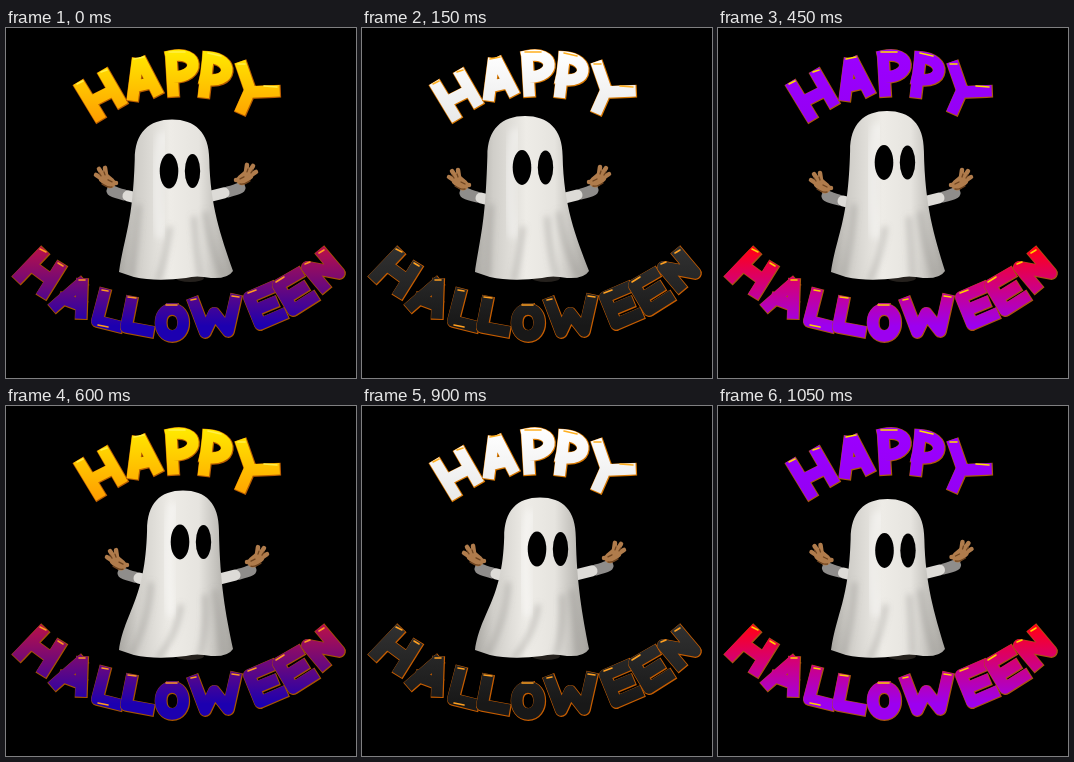
These frames come from a looping animation (350x350 px, 1200 ms). An HTML page:

```html
<!DOCTYPE html>
<html lang="en">
<head>
<meta charset="utf-8">
<title>Happy Halloween</title>
<style>
  html, body { margin: 0; width: 100%; height: 100%; overflow: hidden; background: #000; }
  svg { display: block; width: 100%; height: 100%; }
  .word path { fill: none; stroke-linejoin: round; stroke-linecap: square; }
  .word .edge { stroke: var(--edge); stroke-width: 13; }
  .word .face { stroke-width: 11.4; }
  .word .glint { stroke: var(--glint); stroke-width: 1.6; stroke-linecap: round; }
  #happy .face { stroke: url(#happyFill); }
  #halloween .face { stroke: url(#halloweenFill); }
  .stopA { stop-color: var(--a); }
  .stopB { stop-color: var(--b); }
  .fold { fill: none; stroke-linecap: round; filter: url(#soft); }
  .skin, .sleeve { fill: none; stroke: #b07c4c; stroke-linecap: round; stroke-linejoin: round; }
  .shade { stroke: #6e4420; }
  .sleeve { stroke-width: 11; }
</style>
</head>
<body>
<svg viewBox="0 0 350 350" role="img" aria-label="Happy Halloween">
  <defs>
    <linearGradient id="happyFill" gradientUnits="userSpaceOnUse" x1="0" y1="24" x2="0" y2="94">
      <stop class="stopA"/><stop offset="1" class="stopB"/>
    </linearGradient>
    <linearGradient id="halloweenFill" gradientUnits="userSpaceOnUse" x1="0" y1="222" x2="0" y2="298">
      <stop class="stopA"/><stop offset="1" class="stopB"/>
    </linearGradient>
    <linearGradient id="cloth">
      <stop stop-color="#a9a7a2"/><stop offset=".16" stop-color="#d0cec9"/>
      <stop offset=".45" stop-color="#eeece7"/><stop offset=".7" stop-color="#e6e4df"/>
      <stop offset="1" stop-color="#a3a19c"/>
    </linearGradient>
    <filter id="soft" x="-50%" y="-50%" width="200%" height="200%">
      <feGaussianBlur stdDeviation="3"/>
    </filter>
    <clipPath id="bodyClip"><path class="outline"/></clipPath>
    <g id="arm">
      <path class="sleeve" stroke="#8f8d8b" style="stroke:#8f8d8b" d="M6 13Q10 15 18 17"/>
      <path class="sleeve" style="stroke:#dddbd7" d="M22 18L38 22"/>
      <path class="skin" stroke-width="11" d="M-2 0L4 5"/>
      <path class="skin" stroke-width="4.5" d="M-4 1L-10 -3M-3 -3L-7 -9M0 -3L-1 -10M4 5L10 5"/>
      <path class="skin shade" stroke-width="1.3" d="M-4 6Q2 10 6 9M-5 -2L-7 -5M-1 -3L-2 -6M2 2L6 4"/>
    </g>
  </defs>
  <rect width="350" height="350"/>
  <g id="happy" class="word"></g>
  <g id="ghost">
    <ellipse cx="184" cy="250" rx="14" ry="4" fill="#25211d"/>
    <use id="leftArm" href="#arm"/>
    <use id="rightArm" href="#arm"/>
    <path class="outline" fill="url(#cloth)"/>
    <g clip-path="url(#bodyClip)">
      <path id="folds" class="fold" stroke="#8c8a86" stroke-opacity=".5" stroke-width="4"/>
      <path id="shine" class="fold" stroke="#fff" stroke-opacity=".35" stroke-width="12"/>
    </g>
    <g id="eyes">
      <ellipse rx="9.3" ry="17.5"/>
      <ellipse cx="23.5" rx="7.7" ry="17"/>
    </g>
  </g>
  <g id="halloween" class="word"></g>
</svg>
<script>
const find = id => document.getElementById(id);

// Each letter: strokes, then a short highlight.
const words = {
  happy: [
    ['M75 59L92 87M99 47L114 73M86 73L106 63', 'M71 56L77 53M95 44L101 42'],
    ['M131 36L127 67M136 35L150 62M131 58L144 55', 'M128 31L138 29'],
    ['M165 29L167 63M165 28C193 22 195 49 167 49', 'M163 24L179 24'],
    ['M202 30L198 64M202 29C229 31 226 57 199 51', 'M202 25L215 28'],
    ['M236 39L244 62L236 80M268 63L244 64', 'M232 36L239 36M258 58L271 59']
  ],
  halloween: [
    ['M35 226L14 248M53 240L38 264M26 238L45 252', 'M34 221L40 224M52 235L57 238'],
    ['M74 256L50 277M76 256L75 285M58 271L74 277', 'M73 252L79 252'],
    ['M98 266L91 293L111 298', 'M96 262L102 263M92 297L102 299'],
    ['M125 274L120 299L142 303', 'M122 269L130 270'],
    ['M166 281C151 281 151 308 166 308S181 281 166 281', 'M160 277L171 277'],
    ['M188 275L199 304L208 285L222 303L229 272', 'M185 272L190 271M226 268L233 269'],
    ['M264 260L243 269L254 296L275 287M249 282L266 275', 'M242 265L250 262'],
    ['M291 246L272 257L287 282L306 270M280 270L296 260', 'M270 254L278 249'],
    ['M317 258L301 239L333 245L317 226', 'M299 236L304 234M313 225L318 222']
  ]
};
for (const [id, letters] of Object.entries(words)) {
  find(id).innerHTML = letters.map(([strokes, glint]) =>
    `<path class="edge" d="${strokes}" transform="translate(.4 .4)"/>
     <path class="face" d="${strokes}"/><path class="glint" d="${glint}"/>`).join('');
}

// Top colour, bottom colour, rim, highlight for each word.
const schemes = {
  gold: [['#ffe900', '#ff9d00', '#b85c00', '#fff04a'], ['#b4104c', '#1c00b0', '#a65400', '#ff9a20']],
  white: [['#ffffff', '#e9e9e9', '#d87800', '#ffb020'], ['#303030', '#181818', '#c45c00', '#ffa020']],
  yellow: [['#fff500', '#ffe500', '#c05a00', '#ffff70'], ['#ff5428', '#ff2800', '#96441a', '#ffb060']],
  purple: [['#9c00ff', '#9400f4', '#aa5a08', '#ffe000'], ['#ff0018', '#9c00f0', '#aa5410', '#ffd000']]
};
const schemeOrder = ['gold', 'white', 'yellow', 'purple', 'gold', 'white', 'white', 'purple'];
const headX = [166, 163, 166, 169, 177, 184, 178, 169.5];
const STEP = 150;

function paint(target, values) {
  ['--a', '--b', '--edge', '--glint'].forEach((name, i) => target.style.setProperty(name, values[i]));
}

function drawGhost(x, top, handY) {
  // The head narrows a little as it turns to the right.
  const half = 36.3 - (x - 174) * 0.12;
  const left = x - half, right = x + half, brow = top + 40;
  const outline = `M${left} ${brow}C${left} ${top + 13} ${x - 23} ${top} ${x} ${top}
    C${x + 23} ${top} ${right} ${top + 13} ${right} ${brow}
    C${right + 1} 178 ${(right + 226) / 2} 207 227 243
    Q222 251 205 250Q190 247 180 250Q150 254 128 249L113 244
    C119 205 ${left - 2} 195 ${left} ${brow}Z`;
  document.querySelectorAll('.outline').forEach(path => path.setAttribute('d', outline));
  find('folds').setAttribute('d', `M${left + 4} 178Q${left + 2} 212 126 248
    M${x - 2} 200Q${x - 6} 228 152 252M${x + 22} 190Q${x + 24} 220 194 248M${right - 4} 185Q${right} 215 216 248`);
  find('shine').setAttribute('d', `M${x - 10} ${top + 18}Q${x - 20} ${top + 60} ${x - 12} 205`);
  find('eyes').setAttribute('transform', `translate(${x - 3} ${top + 51.5})`);
  find('leftArm').setAttribute('transform', `translate(${x - 66} ${handY})`);
  find('rightArm').setAttribute('transform', `translate(${x + 74} ${handY - 3}) scale(-1 1)`);
}

let shown = -1;
function tick() {
  const step = Math.floor(performance.now() / STEP) % 8;
  if (step !== shown) {
    shown = step;
    const bob = Math.cos((step - 3) * Math.PI / 4);
    drawGhost(headX[step], 88 - 5 * bob, 152 + 3 * bob);
    const [upper, lower] = schemes[schemeOrder[step]];
    paint(find('happyFill'), upper);
    paint(find('happy'), upper);
    paint(find('halloweenFill'), lower);
    paint(find('halloween'), lower);
  }
  requestAnimationFrame(tick);
}
tick();
</script>
</body>
</html>
```
